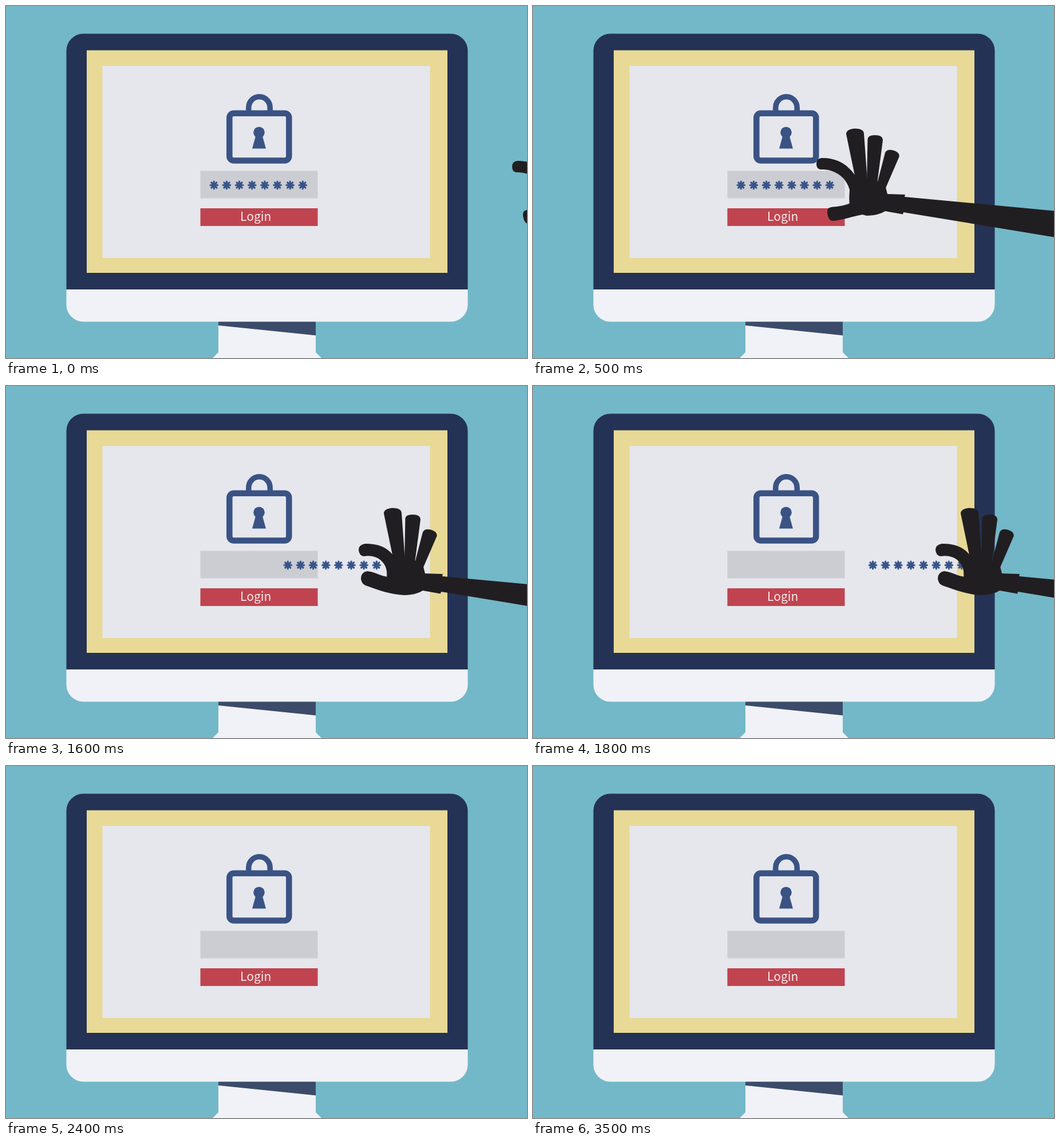
These frames come from a looping animation (910 px wide and 616 px high, 3800 ms). An HTML page:

```html
<!DOCTYPE html>
<html lang="en">
<head>
<meta charset="utf-8">
<title>Password theft</title>
<style>
  html, body { margin: 0; width: 100%; height: 100%; overflow: hidden; background: #73b8c8; }
  svg { display: block; width: 910px; height: 616px; }
  text { font: 500 21px "Noto Sans CJK SC", "Noto Sans CJK JP", "Noto Sans", sans-serif; }
</style>
</head>
<body>
<svg viewBox="0 0 910 616">
  <defs>
    <path id="star" d="M0-6.3V6.3M-6.3 0H6.3M-4.5-4.5L4.5 4.5M-4.5 4.5L4.5-4.5"
      fill="none" stroke="#38548a" stroke-width="3.2" stroke-linecap="round"/>
  </defs>

  <rect width="910" height="616" fill="#73b8c8"/>

  <!-- stand -->
  <path d="M371 550H541V606L551 616H361L371 606Z" fill="#f0f2f7"/>
  <path d="M371 550H541V576.5L371 559Z" fill="#3b4b69"/>

  <!-- monitor -->
  <path d="M105.500 496V78a29.500 29.500 0 0 1 29.500-29.500H777a29.500 29.500 0 0 1 29.500 29.500V496Z" fill="#243255"/>
  <path d="M105.500 496H806.500V523a29.500 29.500 0 0 1-29.500 29.500H135a29.500 29.500 0 0 1-29.500-29.500Z" fill="#f0f2f7"/>
  <rect x="141" y="77.500" width="630" height="389.500" fill="#e8d996"/>
  <rect x="168.500" y="105" width="572" height="336" fill="#e5e7ed"/>

  <!-- lock -->
  <g fill="none" stroke="#3a5384">
    <rect x="390.300" y="187.800" width="104" height="82.700" rx="7.500" stroke-width="10.500"/>
    <path d="M423.800 186V178a18.700 19.300 0 0 1 37.400 0V186" stroke-width="9.500"/>
  </g>
  <g fill="#3a5384">
    <circle cx="442" cy="221.300" r="9.800"/>
    <path d="M436.500 226H447.500L454 249.500H430Z"/>
  </g>

  <!-- form -->
  <rect x="339.500" y="288.500" width="205" height="48" fill="#cccdd3"/>
  <rect x="339.500" y="354" width="205" height="31" fill="#c0444f"/>
  <text x="436.200" y="375.500" text-anchor="middle" fill="#f3eef0">Login</text>

  <g id="stars"></g>

  <g id="hand" fill="#211e21">
    <path d="M549 223Q549 215 563 213.500Q579 213 580 222L586 305H566Z"/>
    <path d="M586.500 232Q587 225 599 225Q613 225 613 234L603 310H585Z"/>
    <path d="M617 256Q620 249 631 251.500Q643 255 641.500 263L616 322L603 310Z"/>
    <path d="M562 295L586 300L604 306L618 316L621 328L652 329L651 333L940 360V408L649 360L648 363.500L617 358Q607 365 585 366Q560 360 555 346Q552 320 562 295Z"/>
    <path id="index"/>
    <path id="thumb"/>
  </g>
</svg>

<script>
const LOOP = 3800, STEP = 100;
const $ = id => document.getElementById(id);
const clamp = u => Math.min(1, Math.max(0, u));
const smooth = u => u * u * (3 - 2 * u);

// Each finger: open pose, closed pose
const poses = {
  index: [
    "M568 300C552 276 534 265 506 265Q497 266 497 275Q497 284 504 285C532 284 552 302 556 325L556 345L580 345Z",
    "M568 300C556 282 540 276 516 276Q505 278 505 287Q506 297 514 298C534 294 552 306 554 324L556 345L580 345Z"
  ],
  thumb: [
    "M556 344C545 349 532 350 523 351Q515 352 516 361Q518 376 527 375C545 373 560 367 578 364L600 364L600 340Z",
    "M556 334C545 333 532 325 520 324Q509 326 509 337Q510 346 517 349C540 357 560 365 585 366L600 364L600 340Z"
  ]
};

function blend([a, b], u) {
  const to = b.match(/\d+/g);
  let i = 0;
  return a.replace(/\d+/g, n => +n + (to[i++] - n) * u);
}

for (let i = 0; i < 8; i++) {
  $("stars").innerHTML += `<use href="#star" x="${363.3 + 22.15 * i}" y="313.5"/>`;
}

function draw(t) {
  const left = 1 - clamp(t / 500);
  const away = left * (0.55 + 0.45 * left);
  const grip = smooth(clamp((t - 500) / 500));
  const pull = Math.max(0, t - 1300);
  const slide = 0.384 * pull + 0.000153 * pull * pull;

  const x = 389 * away - 2 * (1 - grip) + 0.86 * slide;
  const y = 5 * away + (1 - grip);
  $("hand").setAttribute("transform", `translate(${x} ${y})`);
  $("stars").setAttribute("transform", `translate(${slide} 0)`);
  for (const id in poses) $(id).setAttribute("d", blend(poses[id], grip));
}

function tick() {
  const t = performance.now() % LOOP;
  draw(Math.floor(t / STEP) * STEP);
  requestAnimationFrame(tick);
}
tick();
</script>
</body>
</html>
```
